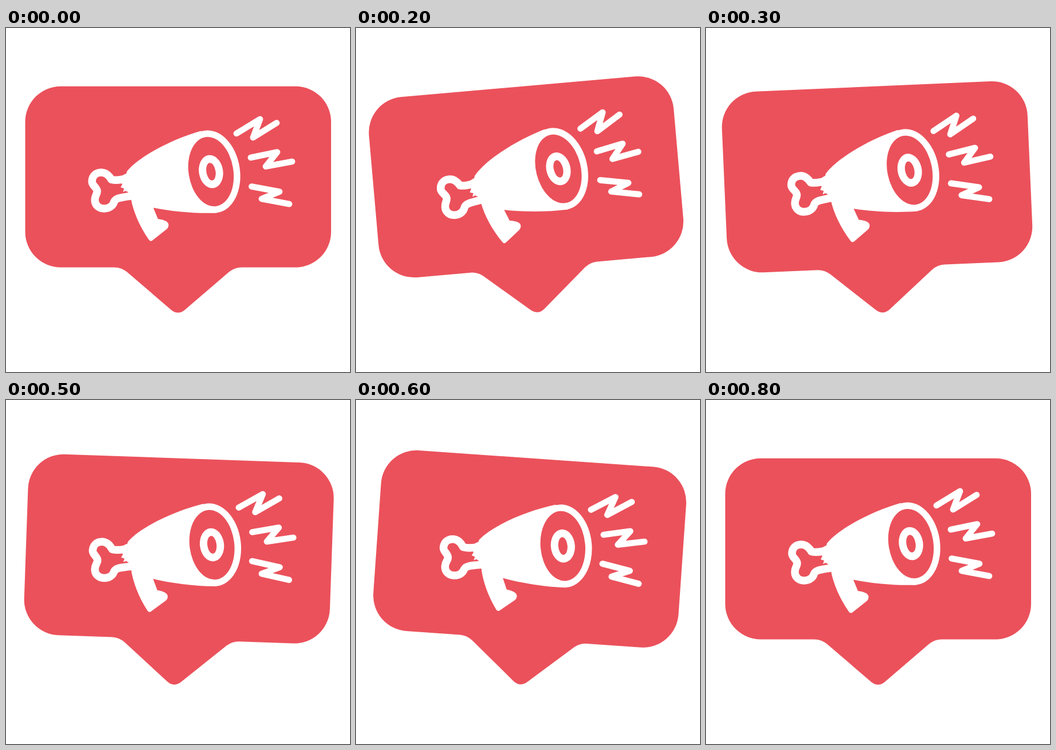
Recreate the animation shown at these times as an HTML page. Size 600 px wide and 600 px high, loop 900 ms.

```html
<!DOCTYPE html>
<html lang="en">
<head>
<meta charset="utf-8">
<title>Ham megaphone</title>
<style>
  html, body { margin: 0; width: 100%; height: 100%; overflow: hidden; background: #fff; }
  svg { display: block; width: 100%; height: 100%; }
  .red { fill: #eb515b; }
  .white { fill: #fff; }
  .line { fill: none; stroke: #fff; stroke-linecap: round; stroke-linejoin: round; }
</style>
</head>
<body>
<svg viewBox="0 0 600 600">
  <g id="badge">
    <path class="red" d="M95.500 101.700H505A62 62 0 0 1 567 163.700V355.500A62 62 0 0 1 505 417.500H411
      Q399 417.500 389 425.500L311.500 492Q300 501 288.500 492L211 425.500Q201 417.500 189 417.500
      H95.500A62 62 0 0 1 33.500 355.500V163.700A62 62 0 0 1 95.500 101.700Z"/>

    <!-- bone -->
    <path class="line" stroke-width="13.500" d="M213 261.500Q196 267 184 264.500C179 256 173 252 166 252
      C156 252 150 259 150 268C150 275 159 278 159 285C159 290 155 292 155 300
      C155 309 162 315 171 315C181 315 187 309 188.500 303C191 297 198 296 218 293"/>
    <path class="white" d="M197 268L203 272 200 278 206 280 204 286 209 284 217 289 222 296V248L205 256Z"/>

    <!-- body and handle -->
    <path class="white" d="M211 250C233 223 292 193 340 179.500L368 322.500C331 324 289 320 257 313.500L265 333
      Q284 335.500 283.500 344Q283.500 348 280 351L256 370Q252 373.500 249 369
      C233 346 222 320 218 298L206 268Z"/>

    <!-- cut face -->
    <g transform="translate(357.500 250.500) rotate(-9)">
      <ellipse class="white" rx="50.500" ry="72.500"/>
      <ellipse class="red" rx="39" ry="61"/>
      <ellipse class="white" rx="21" ry="29"/>
      <ellipse class="red" rx="8" ry="15.500"/>
    </g>

    <!-- sound bolts -->
    <path class="line" stroke-width="10.700" d="M402 184L443 159 431 191 472 165.500
      M427 226L473 216.500 453 241.500 499 233M428.500 276.500L477 285.500 446 298 494 307"/>
  </g>
</svg>
<script>
  const STEP = 100;
  const angles = [0, -2.5, -5, -2.5, 0, 2, 4, 2, 0];
  const badge = document.getElementById("badge");
  const start = performance.now();

  function draw(ms) {
    const i = Math.floor(ms / STEP) % angles.length;
    badge.setAttribute("transform", `rotate(${angles[i]} 300 300)`);
  }

  function tick() {
    draw(performance.now() - start);
    requestAnimationFrame(tick);
  }
  tick();
</script>
</body>
</html>
```
